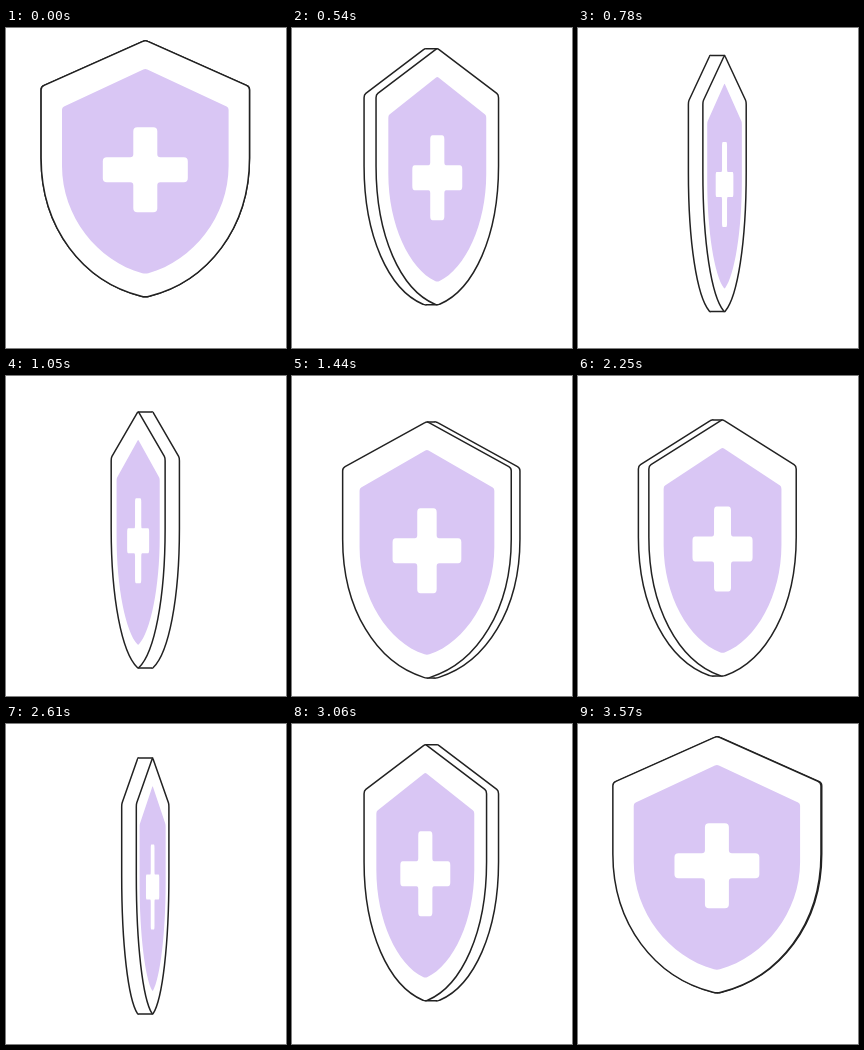
An HTML page without scripts that plays this animation: 280 by 320 pixels, repeating every 3600 ms.

```html
<!DOCTYPE html>
<html lang="en">
<head>
<meta charset="utf-8">
<title>Turning shield</title>
<style>
  @property --turn { syntax: "<angle>"; inherits: true; initial-value: 0deg; }
  @property --sink { syntax: "<number>"; inherits: true; initial-value: 0; }

  html, body { margin: 0; width: 100%; height: 100%; overflow: hidden; background: #fff; }
  svg { display: block; width: 100vw; height: 100vh; }

  /* Both faces look alike, so the nearer one repeats every half turn. */
  .shield {
    --slide: calc(sin(var(--turn)) * 7.4px);
    --squeeze: max(cos(var(--turn)), .001);
    --ease: calc(var(--sink) * var(--sink) * (3 - 2 * var(--sink)));
    animation: turn 1800ms steps(60) -900ms infinite, sink 3600ms steps(60) infinite;
    transform: translate(139.3px, calc(var(--ease) * 37px));
  }
  .near { transform: translateX(var(--slide)) scaleX(var(--squeeze)); }
  .far { transform: translateX(calc(var(--slide) * -1)) scaleX(var(--squeeze)); }
  .rim { transform: scaleX(sin(var(--turn))); }

  .line { fill: #fff; stroke: #222; stroke-width: 1.5; stroke-linejoin: round; vector-effect: non-scaling-stroke; }
  .white { fill: #fff; }
  .lilac { fill: #d9c6f4; }

  @keyframes turn { from { --turn: -90deg; } to { --turn: 90deg; } }
  @keyframes sink { 0%, 100% { --sink: 0; } 50% { --sink: 1; } }
</style>
</head>
<body>
<svg viewBox="0 0 280 320">
  <defs>
    <path id="plate" class="line" d="M-2.5 13.4Q0 12.2 2.5 13.4L101.2 57.4Q104.2 58.7 104.2 61.7V130C104.2 200 62.5 253.5 4 268.2Q0 269.4-4 268.2C-62.5 253.5-104.2 200-104.2 130V61.7Q-104.2 58.7-101.2 57.4Z"/>
  </defs>
  <g class="shield">
    <use href="#plate" class="far"/>
    <g class="rim">
      <path class="white" d="M-7.4 12.8H7.4V268.8H-7.4Z"/>
      <path class="line" d="M-7.4 12.8H7.4M-7.4 268.8H7.4"/>
    </g>
    <g class="near">
      <use href="#plate"/>
      <path class="lilac" d="M-2 41.4Q0 40.4 2 41.4L81.3 78.4Q83.3 79.4 83.3 81.7V138C83.3 188 48 233 3 245.2Q0 246-3 245.2C-48 233-83.3 188-83.3 138V81.7Q-83.3 79.4-81.3 78.4Z"/>
      <path class="white" transform="translate(0 141.7)" d="M-8-42.5H8Q12-42.5 12-38.5V-15.5Q12-12.5 15-12.5H38.5Q42.5-12.5 42.5-8.5V8.5Q42.5 12.5 38.5 12.5H15Q12 12.5 12 15.5V38.5Q12 42.5 8 42.5H-8Q-12 42.5-12 38.5V15.5Q-12 12.5-15 12.5H-38.5Q-42.5 12.5-42.5 8.5V-8.5Q-42.5-12.5-38.5-12.5H-15Q-12-12.5-12-15.5V-38.5Q-12-42.5-8-42.5Z"/>
    </g>
  </g>
</svg>
</body>
</html>
```
